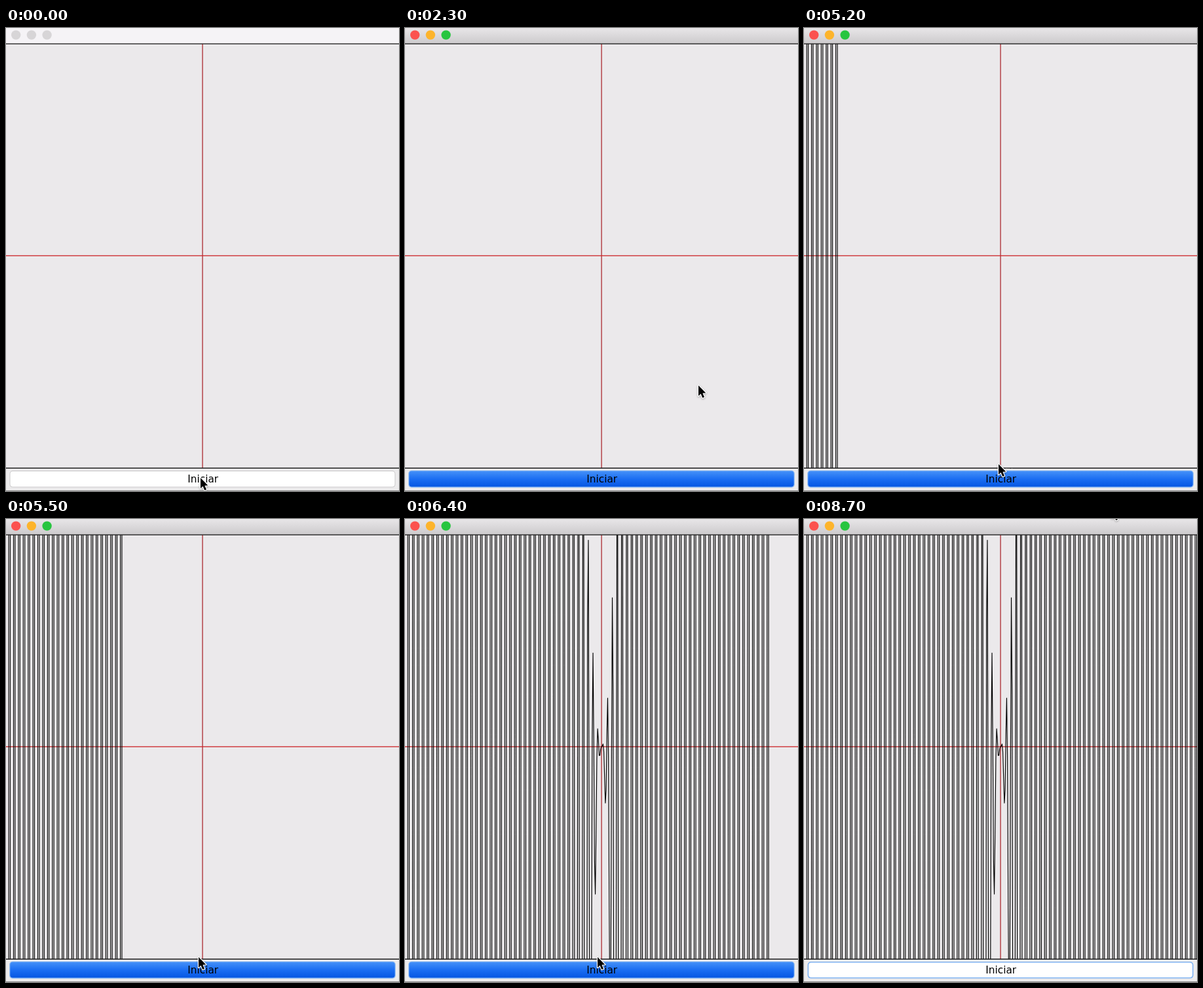
An HTML page with a canvas for the animation above (8.8 s loop, 600x706 px).

```html
<!DOCTYPE html>
<html lang="es">
<head>
<meta charset="utf-8">
<style>
  html, body { margin: 0; width: 100%; height: 100%; overflow: hidden; background: #ececec; }
  canvas { display: block; }
</style>
</head>
<body>
<canvas id="stage" width="600" height="706"></canvas>
<script>
const ctx = document.getElementById('stage').getContext('2d');
const LOOP = 8800, STEP = 100;
const CX = 300, CY = 347, UNIT = 1.18, HALF = 254;
const TOP = 24, BOTTOM = 671;
const PRESS = 500, PLOT = 5070, RELEASE = 6600, RATE = 0.356;

// Pointer tip: [time, x, y]
const PATH = [
  [0, 297, 686], [1400, 297, 686], [2100, 448, 545], [2800, 448, 545],
  [3100, 462, 532], [3800, 462, 532], [4100, 455, 540], [4600, 455, 540],
  [5200, 297, 665], [5500, 294, 668], [7000, 294, 668], [8500, 470, -17], [8800, 470, -17]
];

const curve = u => u * u * (2 * Math.sin(u) - 1);
const ease = k => k * k * (3 - 2 * k);

function rect(x, y, w, h, fill) {
  ctx.fillStyle = fill;
  ctx.fillRect(x, y, w, h);
}

function gradient(y0, y1, ...colors) {
  const g = ctx.createLinearGradient(0, y0, 0, y1);
  colors.forEach((c, i) => g.addColorStop(i / (colors.length - 1), c));
  return g;
}

function rounded(x, y, w, h, r, fill) {
  ctx.beginPath();
  ctx.roundRect(x, y, w, h, r);
  ctx.fillStyle = fill;
  ctx.fill();
}

function titleBar(active) {
  rect(0, 0, 600, TOP, active ? gradient(0, TOP, '#e8e6e8', '#cccacc') : '#f5f3f6');
  const lights = active ? ['#fb524f', '#fdb42b', '#27c53f'] : ['#d7d5d7', '#d7d5d7', '#d7d5d7'];
  lights.forEach((c, i) => {
    ctx.beginPath();
    ctx.arc(15.2 + i * 23.7, 10.6, 7.2, 0, 7);
    ctx.fillStyle = c;
    ctx.fill();
  });
}

// Adds one segment, trimmed to the neighbourhood of the plot area
function segment(u) {
  const a = CY - UNIT * curve(u), b = CY - UNIT * curve(u + 1);
  const lo = -200, hi = 900;
  if (Math.max(a, b) < lo || Math.min(a, b) > hi) return;
  const at = y => {
    const v = Math.min(hi, Math.max(lo, y));
    const k = a === b ? 0 : (v - a) / (b - a);
    return [CX + UNIT * (u + k), v];
  };
  ctx.moveTo(...at(a));
  ctx.lineTo(...(a === b ? [CX + UNIT * (u + 1), b] : at(b)));
}

function plot(t) {
  rect(0, TOP, 600, BOTTOM - TOP, '#ebe9eb');
  rect(299.4, TOP, 1.3, BOTTOM - TOP, '#ac2a30');
  rect(0, 346.6, 600, 1.3, '#cd2529');
  const count = Math.min(2 * HALF, Math.floor((t - PLOT) * RATE));
  if (count > 0) {
    ctx.save();
    ctx.beginPath();
    ctx.rect(0, TOP, 600, BOTTOM - TOP);
    ctx.clip();
    ctx.beginPath();
    for (let i = 0; i < count; i++) segment(i - HALF);
    ctx.strokeStyle = '#000';
    ctx.lineWidth = 1.15;
    ctx.lineCap = 'round';
    ctx.stroke();
    ctx.restore();
  }
  rect(0, 23.5, 600, 1.3, '#1a1a1a');
  rect(0, 670.4, 600, 1.3, '#1a1a1a');
}

function button(state) {
  rect(0, 671.7, 600, 34.3, '#ecebec');
  rect(0, 705, 600, 1, '#8c8c8c');
  if (state === 'down') {
    rounded(5, 674.5, 590, 26.5, 5, '#9cc3f3');
    rounded(6.3, 675.6, 587.4, 24, 4, gradient(676, 700, '#438ff8', '#1a6df2', '#0556e2'));
  } else {
    const ring = state === 'focus';
    rounded(5.5, 675, 589, 25.6, 5, ring ? '#82b4f2' : '#c9c8c9');
    const m = ring ? 1.6 : 1;
    rounded(5.5 + m, 675 + m, 589 - 2 * m, 25.6 - 2 * m, 4, '#fff');
  }
  ctx.fillStyle = '#000';
  ctx.font = '15.3px "DejaVu Sans", sans-serif';
  ctx.textAlign = 'center';
  ctx.fillText('Iniciar', 300.7, 693);
}

function pointer(t) {
  let i = 0;
  while (i < PATH.length - 2 && t >= PATH[i + 1][0]) i++;
  const [t0, x0, y0] = PATH[i], [t1, x1, y1] = PATH[i + 1];
  const k = ease((t - t0) / (t1 - t0));
  ctx.save();
  ctx.translate(x0 + (x1 - x0) * k, y0 + (y1 - y0) * k);
  ctx.beginPath();
  [[0, 0], [0, 16], [3.6, 12.7], [6.3, 19], [9, 17.8], [6.4, 11.7], [11.3, 11.4]]
    .forEach(p => ctx.lineTo(...p));
  ctx.closePath();
  ctx.shadowColor = 'rgba(0,0,0,.3)';
  ctx.shadowBlur = 3;
  ctx.shadowOffsetY = 1;
  ctx.strokeStyle = '#fff';
  ctx.lineWidth = 2.4;
  ctx.lineJoin = 'round';
  ctx.stroke();
  ctx.shadowColor = 'transparent';
  ctx.fillStyle = '#000';
  ctx.fill();
  ctx.restore();
}

function draw(now) {
  const t = Math.floor((now % LOOP) / STEP) * STEP;
  titleBar(t >= PRESS);
  button(t < PRESS ? 'idle' : t < RELEASE ? 'down' : 'focus');
  plot(t);
  pointer(t);
}

const start = performance.now();
function tick() {
  draw(performance.now() - start);
  requestAnimationFrame(tick);
}
tick();
</script>
</body>
</html>
```
